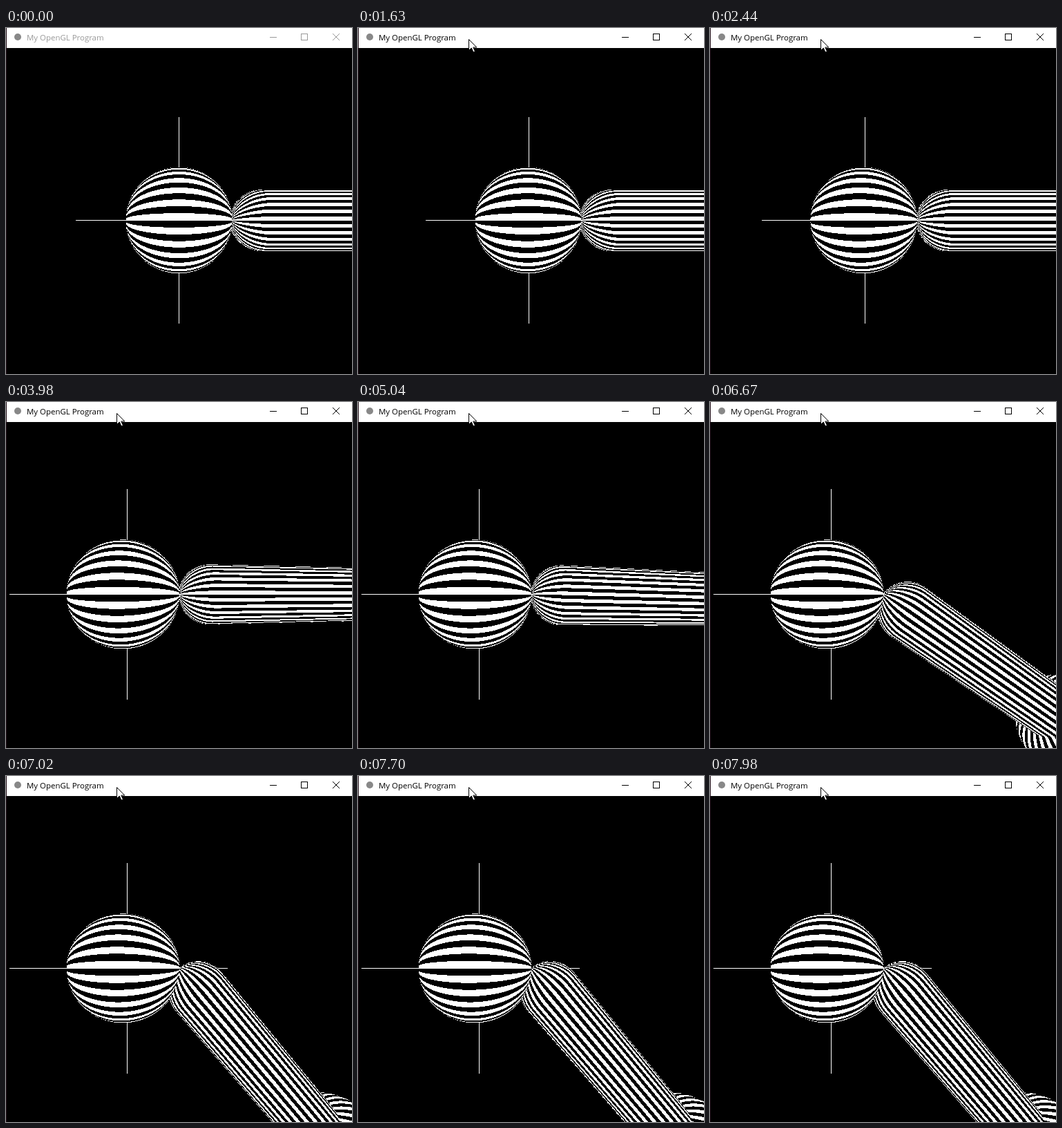
Write an HTML page with a canvas that moves like this. It is 501x501 px and loops after 8000 ms.

```html
<!DOCTYPE html>
<html>
<head>
<meta charset="utf-8">
<style>
html, body { margin: 0; width: 100%; height: 100%; overflow: hidden; background: #000; }
canvas { display: block; }
</style>
</head>
<body>
<canvas id="stage" width="501" height="501"></canvas>
<script>
const ctx = document.getElementById('stage').getContext('2d');
const LOOP = 8000, W = 500, H = 472, FOCAL = 298;
const STRIPE = Math.PI / 30, RAD = Math.PI / 180;
const ARM_RADIUS = 0.595, ELBOW_X = 5.43, ELBOW_RADIUS = 1.18;
const view = ctx.createImageData(W, H);
const pixels = new Uint32Array(view.data.buffer);

// Number of discrete steps taken by time t
const steps = (t, from, count, gap = 70) =>
  Math.max(0, Math.min(count, Math.floor((t - from) / gap) + 1));
const after = (t, ...times) => times.filter(time => t >= time).length;

function stateAt(t) {
  const slide = 0.05 * after(t, 1630) + 0.075 * steps(t, 2230, 4);
  const turn = after(t, 3380, 3710, 3980) / 3;
  const swing = steps(t, 6180, 8), late = steps(t, 6740, 5);
  return {
    eyeX: slide + 0.05 * turn,
    lookX: slide + 0.65 * turn,
    bend: 1.5 * after(t, 5040, 5390, 5570) + 3 * after(t, 6110) + 3.41 * swing + 2.94 * late,
    roll: 2 * steps(t, 7550, 7),
    active: t >= 620,
    pointer: steps(t, 70, 5)
  };
}

function hitSphere(o, d, cx, r) {
  const x = o[0] - cx;
  const a = d[0] * d[0] + d[1] * d[1] + d[2] * d[2];
  const b = x * d[0] + o[1] * d[1] + o[2] * d[2];
  const q = b * b - a * (x * x + o[1] * o[1] + o[2] * o[2] - r * r);
  return q < 0 ? Infinity : (-b - Math.sqrt(q)) / a;
}

// Tube along x with a rounded start at x = 0
function hitArm(o, d, r, length) {
  const a = d[1] * d[1] + d[2] * d[2];
  const b = o[1] * d[1] + o[2] * d[2];
  const q = b * b - a * (o[1] * o[1] + o[2] * o[2] - r * r);
  if (q < 0) return Infinity;
  const k = (-b - Math.sqrt(q)) / a, x = o[0] + k * d[0];
  if (x >= r && x <= length) return k;
  const cap = hitSphere(o, d, r, r);
  return o[0] + cap * d[0] <= r ? cap : Infinity;
}

// Stripes run along x, like slices of an orange
function isWhite(o, d, k) {
  const angle = Math.atan2(o[1] + k * d[1], o[2] + k * d[2]);
  return (Math.floor(angle / STRIPE) & 1) === 0;
}

function renderScene({ eyeX, lookX, bend, roll }) {
  const yaw = Math.atan((lookX - eyeX) / 4);
  const c = Math.cos(yaw), s = Math.sin(yaw);
  const cb = Math.cos(bend * RAD), sb = Math.sin(bend * RAD);
  const cr = Math.cos(roll * RAD), sr = Math.sin(roll * RAD);
  const toArm = ([x, y, z]) => {
    const up = x * sb + y * cb;
    return [x * cb - y * sb, up * cr - z * sr, up * sr + z * cr];
  };
  const eye = [eyeX, 0, 4], armEye = toArm([eyeX - 1, 0, 4]);
  const axisU = Math.ceil(FOCAL * (-c * eyeX - 4 * s) / (4 * c - s * eyeX));

  for (let j = 0; j < H; j++) {
    for (let i = 0; i < W; i++) {
      const px = i - 249, py = 249 - j;
      const u = px / FOCAL, v = py / FOCAL;
      const d = [c * u + s, v, s * u - c], e = toArm(d);
      const body = hitSphere(eye, d, 0, 1);
      const arm = hitArm(armEye, e, ARM_RADIUS, ELBOW_X);
      const elbow = hitSphere(armEye, e, ELBOW_X, ELBOW_RADIUS);
      const near = Math.min(body, arm, elbow);
      let white = false;
      if (near < Infinity) {
        white = near === body ? isWhite(eye, d, near) : isWhite(armEye, e, near);
      }
      if (py === 0 || px === axisU) {
        const k = -4 / d[2];
        const reach = py === 0 ? eyeX + k * d[0] : k * v;
        if (k > 0 && k < near && Math.abs(reach) <= 2) white = true;
      }
      pixels[j * W + i] = white ? 0xffffffff : 0xff000000;
    }
  }
}

function drawTitleBar(active) {
  const ink = active ? '#000' : '#999';
  ctx.fillStyle = '#fff';
  ctx.fillRect(1, 0, 500, 29);
  ctx.fillStyle = '#888';
  ctx.beginPath();
  ctx.arc(17, 13, 5, 0, 7);
  ctx.fill();
  ctx.fillStyle = ctx.strokeStyle = ink;
  ctx.font = '11.45px "Open Sans", sans-serif';
  ctx.fillText('My OpenGL Program', 30, 18);
  ctx.lineWidth = 1;
  ctx.fillRect(382, 13, 10, 1);
  ctx.strokeRect(427.5, 8.5, 9, 9);
  ctx.beginPath();
  ctx.moveTo(473, 8); ctx.lineTo(483, 18);
  ctx.moveTo(483, 8); ctx.lineTo(473, 18);
  ctx.stroke();
}

function drawPointer(step) {
  if (!step) return;
  const left = ((5 - step) / 4) ** 1.3;
  const x = Math.round(160 + 223 * left), y = Math.round(16 + 359 * left);
  const arrow = new Path2D('M.5 .5V16.5L4.3 13L7 19L9.5 18L6.8 12H11.8Z');
  ctx.save();
  ctx.translate(x, y);
  ctx.fillStyle = '#fff';
  ctx.strokeStyle = '#000';
  ctx.fill(arrow);
  ctx.stroke(arrow);
  ctx.restore();
}

let lastKey = '', lastScene = '';
function tick(now) {
  const state = stateAt(now % LOOP);
  const key = JSON.stringify(state);
  if (key !== lastKey) {
    const scene = [state.eyeX, state.lookX, state.bend, state.roll].join();
    if (scene !== lastScene) renderScene(state);
    ctx.putImageData(view, 1, 29);
    ctx.fillStyle = '#22101a';
    ctx.fillRect(0, 0, 1, 501);
    drawTitleBar(state.active);
    drawPointer(state.pointer);
    lastKey = key;
    lastScene = scene;
  }
  requestAnimationFrame(tick);
}
requestAnimationFrame(tick);
</script>
</body>
</html>
```
